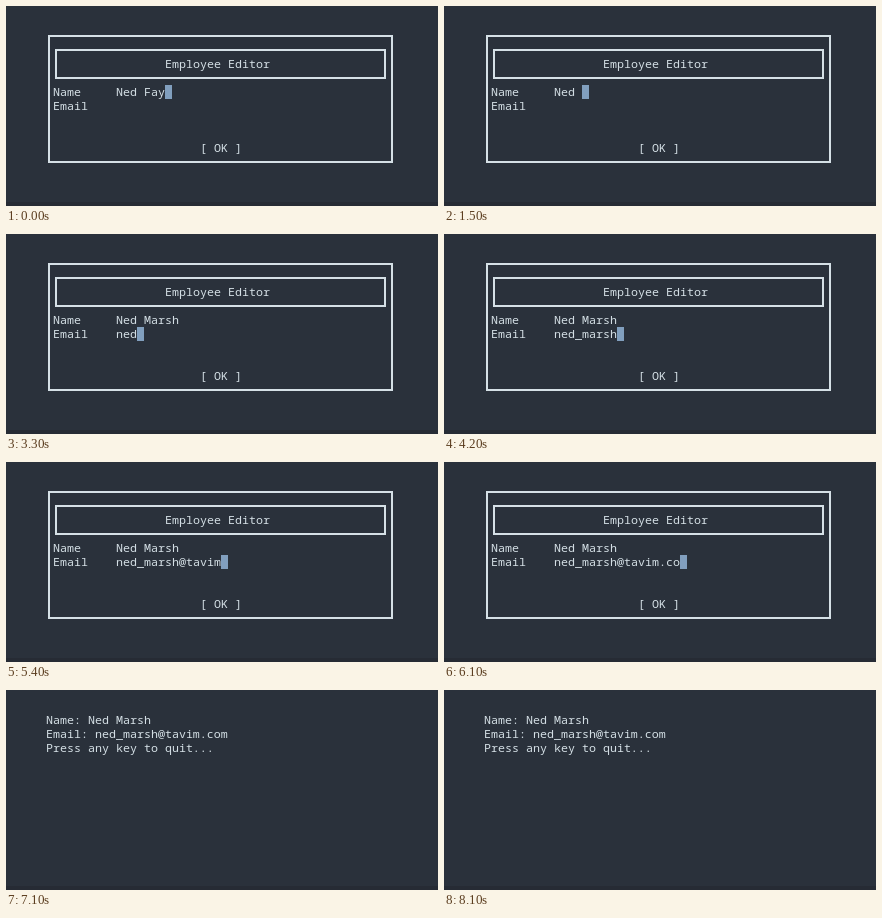
Write an HTML page that moves like this. It is 432 by 200 pixels and loops after 8.3 s.

```html
<!DOCTYPE html>
<html lang="en">
<head>
<meta charset="utf-8">
<title>Employee Editor</title>
<style>
  html, body { margin: 0; width: 100%; height: 100%; overflow: hidden; background: #2a313b; }
  svg { display: block; width: 432px; height: 200px; }
  text { font: 11.667px "Noto Sans Mono", "DejaVu Sans Mono", monospace; white-space: pre; fill: #d5e0e6; }
  .frame { fill: none; stroke: #d5e0e6; stroke-width: 2; }
</style>
</head>
<body>
<svg id="stage" viewBox="0 0 432 200">
  <rect width="432" height="200" fill="#2a313b"/>
  <rect y="196" width="432" height="4" fill="#262b34"/>
  <g id="form">
    <rect class="frame" x="43" y="30" width="343" height="126"/>
    <rect class="frame" x="50" y="44" width="329" height="28"/>
  </g>
  <g id="result"></g>
</svg>
<script>
const LOOP = 8300;
const CELL = { x: 40, y: 23, w: 7, h: 14 };
const FIRST = "Ned ", OLD_LAST = "Fay", NEW_LAST = "Marsh";
const EMAIL = "ned_marsh@tavim.com";

// Key press times in ms
const ERASE = [800, 1000, 1200];
const TYPE_NAME = [1700, 1900, 2000, 2200, 2300];
const TO_EMAIL = 2500;
const TYPE_EMAIL = [3100, 3200, 3300, 3500, 3700, 3800, 4000, 4100, 4200,
  4700, 4800, 4900, 5100, 5200, 5300, 5700, 5800, 6000, 6200];
const TO_OK = 6500;
const SUBMIT = 7100;

const byId = id => document.getElementById(id);
const form = byId("form"), result = byId("result");
const colX = col => CELL.x + col * CELL.w;
const rowY = row => CELL.y + row * CELL.h;

function add(parent, tag, attrs, content = "") {
  const el = document.createElementNS("http://www.w3.org/2000/svg", tag);
  for (const key in attrs) el.setAttribute(key, attrs[key]);
  el.textContent = content;
  return parent.appendChild(el);
}

const label = (parent, col, row, content) =>
  add(parent, "text", { x: colX(col), y: rowY(row) + 11 }, content);

const block = (col, row, cols, fill) =>
  add(form, "rect", { x: colX(col), y: rowY(row), width: cols * CELL.w, height: CELL.h, fill });

label(form, 17, 2, "Employee Editor");
label(form, 1, 4, "Name");
label(form, 1, 5, "Email");
const nameText = label(form, 10, 4, "");
const emailText = label(form, 10, 5, "");
const cursor = block(0, 4, 1, "#819fbe");
const highlight = block(22, 8, 6, "#d5e0e6");
const okText = label(form, 22, 8, "[ OK ]");

["Name: " + FIRST + NEW_LAST, "Email: " + EMAIL, "Press any key to quit..."]
  .forEach((line, row) => label(result, 0, row, line));

const pressed = (times, t) => times.filter(time => time <= t).length;
const show = (el, on) => el.setAttribute("visibility", on ? "visible" : "hidden");

function draw(t) {
  const last = t < TYPE_NAME[0]
    ? OLD_LAST.slice(0, OLD_LAST.length - pressed(ERASE, t))
    : NEW_LAST.slice(0, pressed(TYPE_NAME, t));
  const name = FIRST + last;
  const email = EMAIL.slice(0, pressed(TYPE_EMAIL, t));
  const inEmail = t >= TO_EMAIL, onOk = t >= TO_OK, done = t >= SUBMIT;

  nameText.textContent = name;
  emailText.textContent = email;
  cursor.setAttribute("x", colX(10 + (inEmail ? email : name).length));
  cursor.setAttribute("y", rowY(inEmail ? 5 : 4));
  okText.style.fill = onOk ? "#2a313b" : "";
  show(form, !done);
  show(result, done);
  show(cursor, !onOk && !done);
  show(highlight, onOk && !done);
}

const start = performance.now();
function tick() {
  draw((performance.now() - start) % LOOP);
  requestAnimationFrame(tick);
}
tick();
</script>
</body>
</html>
```
